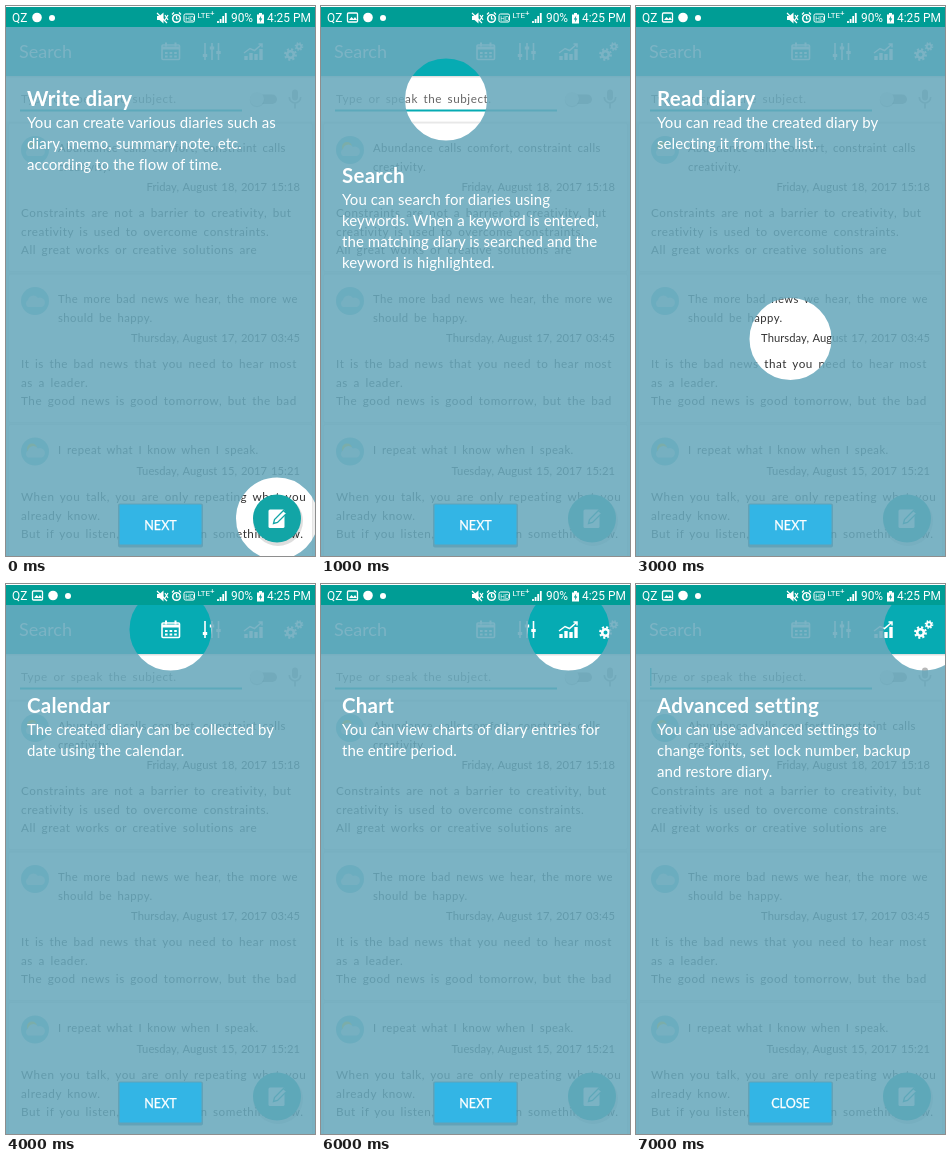
Animation, 309 px wide and 550 px high, one loop 8 s. Source, as an HTML page:

```html
<!DOCTYPE html>
<html lang="en">
<head>
<meta charset="utf-8">
<title>Diary walkthrough</title>
<style>
  html, body { margin: 0; width: 100%; height: 100%; overflow: hidden; }
  svg { display: block; width: 309px; height: 550px; font-family: Lato, "Open Sans", sans-serif; }
  .hand { font-size: 11.7px; letter-spacing: .55px; word-spacing: 2px; fill: #333; }
  .title { font-size: 11.3px; letter-spacing: .45px; }
  .date { font-size: 11.2px; letter-spacing: .05px; word-spacing: 1px; text-anchor: end; }
  .hint { fill: #666; }
  .status { font-family: Roboto, sans-serif; font-size: 11.9px; fill: #fff; }
  .line { fill: none; stroke: #fff; }
  .head { font-size: 20.5px; font-weight: 700; letter-spacing: .25px; fill: #fff; }
  .copy { font-size: 15px; letter-spacing: .08px; fill: #fff; }
  .label { font-size: 12.6px; fill: #fff; stroke: #fff; stroke-width: .25px; text-anchor: middle; }
  .veil { fill: none; stroke: rgb(105 169 188 / .88); stroke-width: 800px; }
  .scene { visibility: hidden; animation: show 8s step-end infinite; }
  .notices { animation: slide 8s step-end infinite; }
  .picture { animation: appear 8s step-end infinite; }
  @keyframes show { 0% { visibility: visible } 12.5%, 100% { visibility: hidden } }
  @keyframes slide { 0% { transform: translateX(-16px) } 12.5%, 100% { transform: none } }
  @keyframes appear { 0% { visibility: hidden } 12.5%, 100% { visibility: visible } }
</style>
</head>
<body>
<svg viewBox="0 0 309 550">
  <defs>
    <g id="gear" class="line">
      <circle r="3.3" stroke-width="2.6"/>
      <circle r="5.3" stroke-width="2.2" stroke-dasharray="2.08 2.08"/>
    </g>
    <path id="cloud" d="M-7 5a4 4 0 0 1 0-7a5.5 5.5 0 0 1 10-2a4.6 4.6 0 0 1 4 9z"/>
    <g id="button">
      <rect x="112" y="497.5" width="85" height="44" rx="2" fill="#1f6f8f" opacity=".25"/>
      <rect x="113.5" y="498.5" width="82" height="40" rx="1" fill="#33b5e5"/>
    </g>
  </defs>

  <rect width="309" height="550" fill="#fff"/>
  <rect y="115.5" width="309" height="434.5" fill="#eee"/>
  <rect y="20" width="309" height="50" fill="#06abb3"/>
  <rect y="70" width="309" height="1.5" fill="#000" opacity=".12"/>

  <text x="13" y="52" font-size="18" fill="#fff">Search</text>
  <g class="line" stroke-width="1.6">
    <rect x="156" y="39" width="17.5" height="14.5" rx="1"/>
    <path d="M156 42h17.5" stroke-width="3"/>
    <path d="M160 36.5v4M169.5 36.5v4" stroke-width="2"/>
    <path d="M159 47h12M159 50.5h12" stroke-width="2.2" stroke-dasharray="2.6 2"/>
    <path d="M199 37v17M206 37v17M212.5 37v17"/>
    <path d="M196.8 49.5h4.4M203.8 42h4.4M210.3 46.5h4.4" stroke-width="3"/>
    <path d="M240 54v-4M245 54v-7M250 54v-6M255 54v-11" stroke-width="3.4"/>
    <path d="M238 47l6-4.5 4.5 2 7.5-6.5m-3.5 0h3.5v3.5" stroke-width="1.5"/>
  </g>
  <use href="#gear" transform="translate(284.5 48.5)"/>
  <use href="#gear" transform="translate(293 40.5) scale(.68)"/>

  <text class="hand hint" x="15" y="97">Type or speak the subject.</text>
  <rect x="14" y="103.5" width="222" height="2" fill="#06abb3"/>
  <rect x="247" y="88.5" width="24" height="9.5" rx="4.7" fill="#b3b3b3"/>
  <circle cx="251" cy="94" r="7.3" fill="#000" opacity=".18"/>
  <circle cx="251" cy="93" r="7" fill="#f2f2f2"/>
  <g fill="none" stroke="#b8b8b8" stroke-width="1.7">
    <rect x="286" y="83.5" width="6" height="11" rx="3" fill="#b8b8b8" stroke="none"/>
    <path d="M283.3 91a5.7 6 0 0 0 11.4 0M289 97v5.5"/>
  </g>

  <g id="cards"></g>

  <circle cx="272" cy="515" r="25" fill="#000" opacity=".13"/>
  <circle cx="271" cy="512.5" r="24" fill="#12a5a6"/>
  <rect x="262.5" y="503.5" width="16" height="18.5" rx="1.5" fill="#fff"/>
  <path d="M267.5 517.5l1-4 9-9 3 3-9 9z" fill="#fff" stroke="#12a5a6" stroke-width="1.3"/>

  <g id="scenes"></g>

  <rect width="309" height="1" fill="#fff"/>
  <rect y="1" width="309" height="20" fill="#009d95"/>
  <g class="status">
    <text x="6" y="16">QZ</text>
    <g class="picture line" stroke-width="1.3">
      <rect x="26.5" y="7" width="10" height="9" rx="1"/>
      <path d="M28 14l2.5-3 2 2 1.5-2 2 3z" fill="#fff" stroke="none"/>
    </g>
    <g class="notices">
      <circle cx="47" cy="11.5" r="4.8"/>
      <circle cx="62" cy="12" r="3"/>
    </g>
    <path d="M151 10h2.5l4-3.5v11l-4-3.5h-2.5z"/>
    <path class="line" d="M151 7l10 10M159 9l3 5M162 9l-3 5" stroke-width="1.2"/>
    <circle class="line" cx="170.5" cy="12.5" r="3.8" stroke-width="1.6"/>
    <path class="line" d="M170.5 10v3h2M166 8.5l2-2M175 8.5l-2-2" stroke-width="1.2"/>
    <rect class="line" x="178" y="8" width="10.5" height="8" rx="1.5"/>
    <text x="179.3" y="14.5" style="font-size:6.5px">HD</text>
    <text x="191.5" y="12" style="font-size:8px">LTE<tspan dy="-2">+</tspan></text>
    <path class="line" d="M212 17v-2M214.6 17v-4M217.2 17v-7M219.8 17v-10" stroke-width="1.8"/>
    <text x="225" y="16">90%</text>
    <path d="M251 8.5h2v-1.5h3v1.5h2v9h-7z"/>
    <path d="M255.3 9.5l-2.5 4h1.6l-.6 3 2.5-4h-1.6z" fill="#009d95"/>
    <text x="261" y="16">4:25 PM</text>
  </g>
</svg>

<script>
  const text = (cls, x, y, str) => `<text class="${cls}" x="${x}" y="${y}">${str}</text>`;
  const lines = (cls, x, y, step, list) =>
    list.map((str, i) => text(cls, x, y + i * step, str)).join('');

  const cards = [
    { top: 117, date: 185, sun: true,
      title: ['Abundance calls comfort, constraint calls', 'creativity.'],
      when: 'Friday, August 18, 2017 15:18',
      body: ['Constraints are not a barrier to creativity, but',
             'creativity is used to overcome constraints.',
             'All great works or creative solutions are'] },
    { top: 268, date: 336,
      title: ['The more bad news we hear, the more we', 'should be happy.'],
      when: 'Thursday, August 17, 2017 03:45',
      body: ['It is the bad news that you need to hear most',
             'as a leader.',
             'The good news is good tomorrow, but the bad'] },
    { top: 418.5, date: 469, sun: true,
      title: ['I repeat what I know when I speak.'],
      when: 'Tuesday, August 15, 2017 15:21',
      body: ['When you talk, you are only repeating what you',
             'already know.',
             'But if you listen, you may learn something new.'] }
  ];

  const drawCard = c => `
    <rect x="2.5" y="${c.top}" width="304" height="148.5" rx="2" fill="#fff" stroke="#ddd" stroke-width=".7"/>
    <g transform="translate(29 ${c.top + 27})">
      <circle r="14" fill="#7fcbd3"/>
      ${c.sun ? '<circle cx="-3" cy="-3" r="5" fill="#ffd21f"/>' : ''}
      <use href="#cloud" y="1" fill="#d5e6ea"/>
    </g>
    ${lines('hand title', 52, c.top + 29, 19, c.title)}
    ${text('hand date', 294, c.date, c.when)}
    ${lines('hand', 15, c.date + 26, 18.6, c.body)}`;

  // x, y: spotlight centre; base: heading baseline; caret: input caret is lit
  const scenes = [
    { x: 271, y: 512.5, base: 100, head: 'Write diary',
      copy: ['You can create various diaries such as',
             'diary, memo, summary note, etc.',
             'according to the flow of time.'] },
    { x: 125, y: 93.5, base: 177, head: 'Search',
      copy: ['You can search for diaries using',
             'keywords. When a keyword is entered,',
             'the matching diary is searched and the',
             'keyword is highlighted.'] },
    { x: 259.5, y: 93.5, base: 177, head: 'Speech recognition', caret: true,
      copy: ['You can use the speech recognition',
             'feature to enter search keywords',
             'without a keypad.'] },
    { x: 154.5, y: 333, base: 100, head: 'Read diary',
      copy: ['You can read the created diary by',
             'selecting it from the list.'] },
    { x: 164.5, y: 45.5, base: 129, head: 'Calendar',
      copy: ['The created diary can be collected by',
             'date using the calendar.'] },
    { x: 206, y: 45.5, base: 129, head: 'Timeline',
      copy: ['The created diary can be viewed in',
             'order of time using the timeline.'] },
    { x: 247.5, y: 45.5, base: 129, head: 'Chart',
      copy: ['You can view charts of diary entries for',
             'the entire period.'] },
    { x: 288.5, y: 45.5, base: 129, head: 'Advanced setting', label: 'CLOSE', caret: true,
      copy: ['You can use advanced settings to',
             'change fonts, set lock number, backup',
             'and restore diary.'] }
  ];

  const drawScene = (s, i) => `
    <g class="scene" style="animation-delay:${i - scenes.length}s">
      ${s.caret ? '<rect x="14" y="84" width="1.5" height="18" fill="#06abb3"/>' : ''}
      <circle class="veil" cx="${s.x}" cy="${s.y}" r="441"/>
      ${text('head', 21, s.base, s.head)}
      ${lines('copy', 21, s.base + 22, 21, s.copy)}
      <use href="#button"/>
      ${text('label', 154.5, 523.5, s.label || 'NEXT')}
    </g>`;

  document.getElementById('cards').innerHTML = cards.map(drawCard).join('');
  document.getElementById('scenes').innerHTML = scenes.map(drawScene).join('');
</script>
</body>
</html>
```
